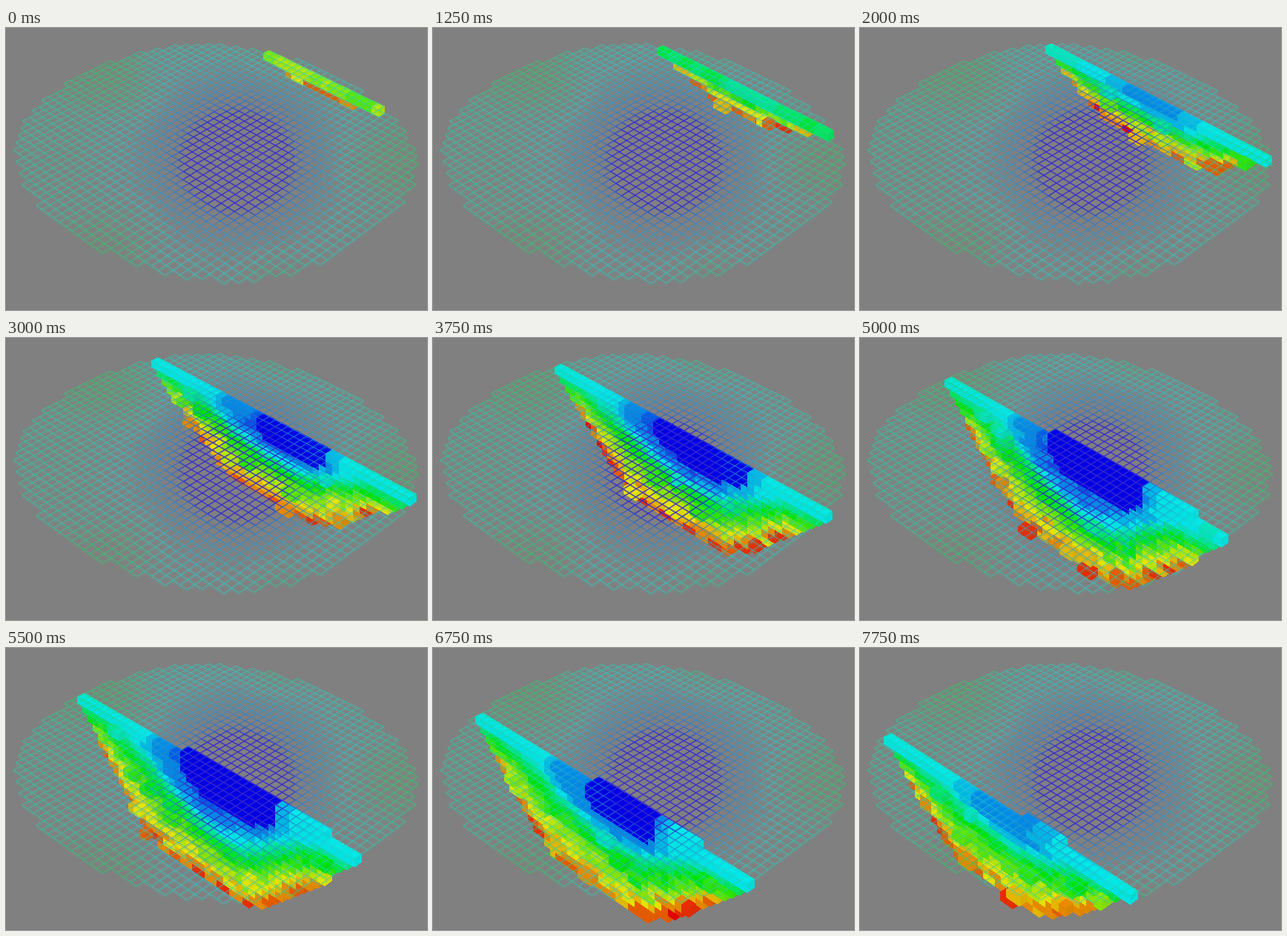
Animation of 568x380 px, one loop 8 s. Source, as a matplotlib script:

```python
import colorsys
import numpy as np
import matplotlib.pyplot as plt
from matplotlib.animation import FuncAnimation
from matplotlib.collections import LineCollection, PolyCollection

W, H, DPI = 568, 380, 100
TICK, TICKS = 250, 32

# Perspective ground plane: vanishing points of the two grid directions
VP_A = np.array([-1534.0, -892.0])
VP_B = np.array([2056.0, -892.0])
ORIGIN = np.array([312.0, 180.0])
STEP_A, STEP_B, ROW0 = -0.00463, 0.00515, 21.4
LAYER = 9.1

# Bowl, in cells: a runs along a slice, i counts slices from the back
MID_A, MID_I = -4.2, 21
HALF_A, HALF_I, DEPTH = 22.5, 19.5, 15.8


def project(a, i, k=0.0):
    wa, wb = a * STEP_A, (ROW0 - i) * STEP_B
    d = 1 + wa + wb
    p = (ORIGIN + wa * VP_A + wb * VP_B) / d
    return p[0], p[1] + k * LAYER / d


def row_offset(i):
    return min(1, abs(i - MID_I) / HALF_I)


def span(i):
    half = HALF_A * np.sqrt(1 - row_offset(i) ** 2.5)
    return int(round(MID_A - half)), int(round(MID_A + half))


def row_depth(i):
    return max(2, DEPTH * (1 - row_offset(i) ** 2) ** 1.3)


def layers(a, i):
    a0, a1 = span(i)
    if not a0 <= a < a1:
        return 0
    u = abs(2 * a + 1 - a0 - a1) / (a1 - a0)
    return max(1, round(row_depth(i) * min(1, 1.2 * (1 - u ** 1.6))))


def ridge(i):
    """Cells that stand one layer proud of the slice."""
    half = 11 * (1 - ((i - 20) / 13) ** 2) if i >= 16 else 0
    return round(3 - half), round(3 + half)


def distance(a, i, k, center, radii):
    return np.linalg.norm((np.array([a, i, k]) - center) / radii)


def voxel_hue(a, i, k, n, noise):
    k = max(k, 0)
    if distance(a, i, k, (-1, 19.5, 0), (8, 11, 3.9)) < 1:
        return 240
    halo = distance(a, i, k, (-3.5, 19.5, 0), (11, 14, 6))
    top = np.interp(halo, [0.6, 1, 1.15], [212, 196, 178])
    rim = 1.2 * row_offset(i) ** 8
    q = rim + (1 - rim) * k / max(n - 1, 0.35 * row_depth(i), 1)
    calm = 0.5 * np.exp(-((a + 1) / 11) ** 2 - ((i - 19.5) / 11) ** 2)
    q = np.clip((q - calm) / (1 - calm), 0, 1)
    hue = top - (top - 28) * q ** 0.9 + noise * (2 + 10 * q)
    return 12 * round(hue / 12)


def rgb(hue, value):
    return colorsys.hsv_to_rgb(max(hue, 0) / 360, 1, value)


def add_voxel(faces, colors, a, i, k, hue, top, side):
    f, b = i + 0.5, i - 0.5
    if top:
        faces.append([project(a, b, k), project(a + 1, b, k),
                      project(a + 1, f, k), project(a, f, k)])
        colors.append(rgb(hue, 0.91))
    if side:
        faces.append([project(a + 1, f, k), project(a + 1, b, k),
                      project(a + 1, b, k + 1), project(a + 1, f, k + 1)])
        colors.append(rgb(hue, 0.86))
    faces.append([project(a, f, k), project(a + 1, f, k),
                  project(a + 1, f, k + 1), project(a, f, k + 1)])
    colors.append(rgb(hue, 0.89))


def build_slice(i):
    rng = np.random.RandomState(40 + i)
    tint, bulge = rng.randn(24, 40), rng.rand(24, 40)
    a0, a1 = span(i)
    r0, r1 = ridge(i)
    faces, colors, front = [], [], []
    for a in range(a0, a1):
        n, n_next = layers(a, i), layers(a + 1, i)
        for k in range(n - 1, -1, -1):
            block = (a - a0 + k) // 2
            hue = voxel_hue(a, i, k, n, tint[k, block])
            add_voxel(faces, colors, a, i, k, hue, k == 0, k >= n_next)
            if k > 0 and a > a0 + 4 and bulge[k, block] > 0.92 and hue < 180:
                front.append((a, k, hue))
        if r0 <= a < r1:
            hue = voxel_hue(a, i, 0, n, 0)
            add_voxel(faces, colors, a, i, -1, hue, True, a == r1 - 1)
    for a, k, hue in front:
        add_voxel(faces, colors, a, i + 1, k, hue, True, True)
    return faces, colors


def wire_hue(x, y):
    dx, dy = (x - 312) / 75, (y - 180) / 68
    e = np.hypot(dx, dy)
    hue = np.interp(e, [0.9, 1.15, 1.6, 2.1, 3], [245, 214, 196, 180, 166])
    spots = max(0, np.cos(5 * np.arctan2(dy, dx)))
    return hue - 22 * spots * np.clip(e - 1.6, 0, 1)


def build_wires():
    edges = set()
    for i in range(MID_I - 19, MID_I + 20):
        for a in range(*span(i)):
            edges |= {(a, i, a + 1, i), (a, i + 1, a + 1, i + 1),
                      (a, i, a, i + 1), (a + 1, i, a + 1, i + 1)}
    lines, colors, widths = [], [], []
    for a, i, c, j in sorted(edges):
        p, q = project(a, i - 0.5), project(c, j - 0.5)
        hue = wire_hue((p[0] + q[0]) / 2, (p[1] + q[1]) / 2)
        color = colorsys.hsv_to_rgb(hue / 360, 0.8, 0.82)
        core = np.interp(hue, [190, 240], [0, 1])
        lines.append([p, q])
        colors.append((*color, 0.68 + 0.2 * core))
        widths.append(0.8 + 0.3 * core)
        if hue < 205:
            lines.append([(p[0], p[1] + 2.5), (q[0], q[1] + 2.5)])
            colors.append((*color, 0.3))
            widths.append(0.6)
    return LineCollection(lines, colors=colors, linewidths=widths, zorder=3)


def row_at(tick):
    """One row per tick, with a hold at the start and two later on."""
    if 24 <= tick <= 26:
        return 24
    if 27 <= tick <= 28:
        return 27
    return max(3, tick)


fig = plt.figure(figsize=(W / DPI, H / DPI), dpi=DPI, facecolor="#808080")
ax = fig.add_axes([0, 0, 1, 1])
ax.set_xlim(0, W)
ax.set_ylim(H, 0)
ax.axis("off")

slices = {i: build_slice(i) for i in sorted({row_at(t) for t in range(TICKS)})}
voxels = PolyCollection([], linewidths=0.3, antialiaseds=False, zorder=2)
ax.add_collection(voxels, autolim=False)
ax.add_collection(build_wires(), autolim=False)


def draw(tick):
    faces, colors = slices[row_at(tick)]
    voxels.set_verts(faces)
    voxels.set_facecolor(colors)
    voxels.set_edgecolor(colors)
    return [voxels]


anim = FuncAnimation(fig, draw, frames=TICKS, interval=TICK, repeat=True,
                     repeat_delay=0, blit=False)
plt.show()
```
